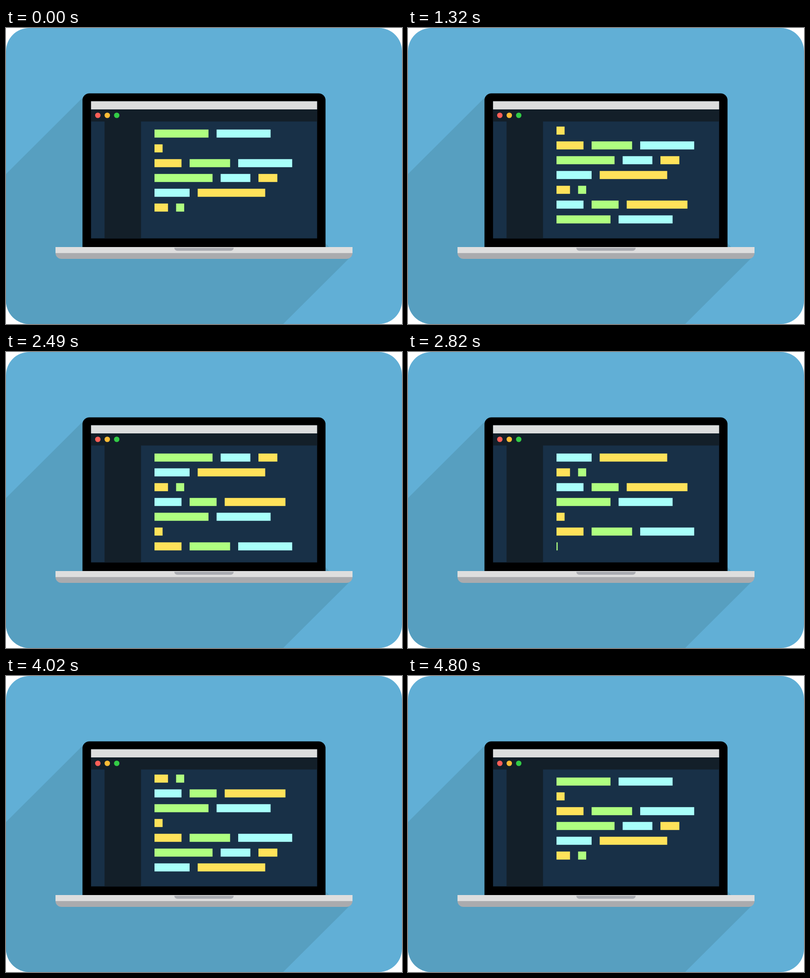
These frames come from a looping animation (800x600 px, 4830 ms). An HTML page:

```html
<!DOCTYPE html>
<html lang="en">
<head>
<meta charset="utf-8">
<title>Laptop typing code</title>
<style>
  html, body { margin: 0; width: 100%; height: 100%; overflow: hidden; background: #fff; }
  svg { display: block; width: 800px; height: 600px; }
</style>
</head>
<body>
<svg viewBox="0 0 800 600">
  <clipPath id="card"><rect width="800" height="600" rx="47"/></clipPath>
  <clipPath id="editor"><rect x="272.7" y="189.5" width="355.8" height="237"/></clipPath>

  <g clip-path="url(#card)">
    <rect width="800" height="600" fill="#61afd6"/>
    <path d="M160 136L0 296V600H560L700 460L653 444L646 437Z" fill="#579fc0"/>
  </g>

  <path d="M154.5 444V146.500a14 14 0 0 1 14-14H631.500a14 14 0 0 1 14 14V444Z" fill="#000"/>
  <rect x="171.800" y="148.500" width="456.700" height="278" fill="#183047"/>
  <rect x="171.800" y="148.500" width="456.700" height="16.500" fill="#dcdddd"/>
  <path d="M171.800 165H628.500V189.500H272.700V426.500H199.100V189.500H171.800Z" fill="#131f29"/>
  <circle cx="185.500" cy="177" r="5.500" fill="#ff5f57"/>
  <circle cx="204.600" cy="177" r="5.500" fill="#fdbc35"/>
  <circle cx="223.700" cy="177" r="5.500" fill="#33cc46"/>

  <g id="code" clip-path="url(#editor)"></g>

  <path d="M100 456H700a12 12 0 0 1-12 12H112a12 12 0 0 1-12-12Z" fill="#aaabae"/>
  <rect x="100" y="444" width="600" height="12.200" fill="#dedede"/>
  <path d="M340 445.500H460a6 6 0 0 1-6 6H346a6 6 0 0 1-6-6Z" fill="#a9abb0"/>
</svg>

<script>
const UNIT = 30 / 11, LEFT = 300, TOP = 205.8, ROW = 30, LAST = 6;
const LOOP = 4830, TICK = 30, PAUSE = 90, SCROLL = 150, CARET = 2.3;
const COLORS = { c: '#a8fffa', g: '#afff80', y: '#ffe25a' };

// Bars of each line in typing order: colour and width in units.
const LINES = ['c20 g20 y45', 'g40 c40', 'y6', 'y20 g30 c40', 'g43 c22 y14', 'c26 y50', 'y10 g6'];
const LONG_HOLD = [2, 6];

const code = document.getElementById('code');
const progress = (t, start, length) => Math.min(1, Math.max(0, (t - start) / length));

function addBar(color, x) {
  const el = document.createElementNS('http://www.w3.org/2000/svg', 'rect');
  el.setAttribute('x', x);
  el.setAttribute('height', 6 * UNIT);
  el.setAttribute('fill', COLORS[color]);
  return code.appendChild(el);
}

let clock = TICK;
const lines = LINES.map((text, i) => {
  let x = LEFT;
  const bars = text.split(' ').map(item => {
    const units = +item.slice(1), width = units * UNIT;
    const bar = { el: addBar(item[0], x), width, start: clock, length: units < 40 ? 60 : 150 };
    x += width + 6 * UNIT;
    clock += bar.length + PAUSE;
    return bar;
  });
  if (LONG_HOLD.includes(i)) clock += 120;
  const scroll = clock;
  clock += SCROLL + PAUSE;
  return { bars, scroll };
});

function barWidth(bar, t) {
  if (t < bar.start) return 0;
  return CARET + (bar.width - CARET) * progress(t, bar.start, bar.length);
}

function draw(t) {
  const scrolled = lines.reduce((sum, line) => sum + progress(t, line.scroll, SCROLL), 0);
  lines.forEach(({ bars }, i) => {
    // A line from the previous pass stays until it has scrolled off the top.
    const old = scrolled < i;
    const row = i - scrolled + (old ? -1 : LAST);
    for (const bar of bars) {
      const width = row <= -1 ? 0 : old ? bar.width : barWidth(bar, t);
      bar.el.setAttribute('y', TOP + row * ROW);
      bar.el.setAttribute('width', width);
    }
  });
}

function frame() {
  const t = performance.now() % LOOP;
  draw(Math.floor(t / TICK) * TICK);
  requestAnimationFrame(frame);
}
frame();
</script>
</body>
</html>
```
